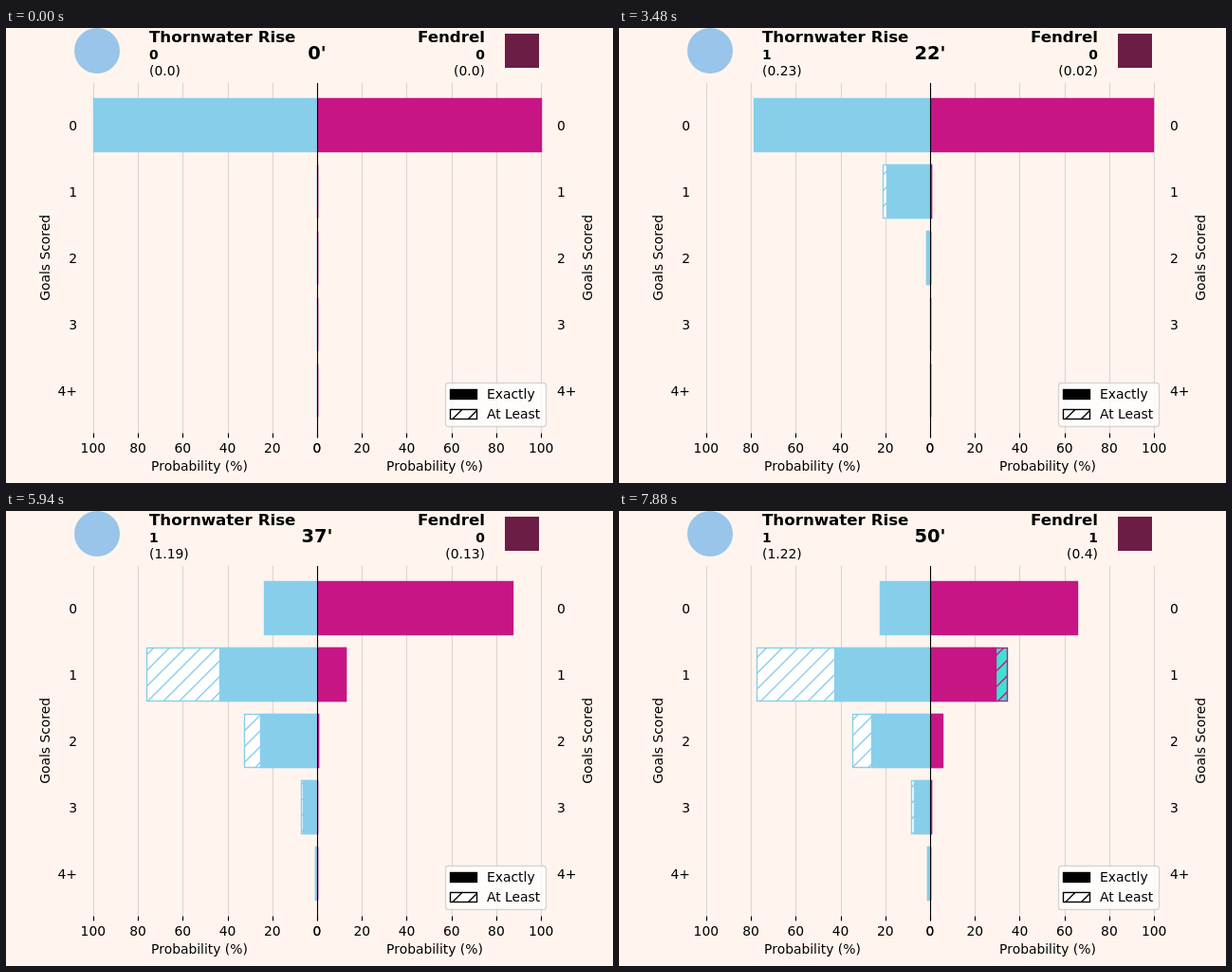
Write an HTML page with a canvas that moves like this. It is 640 px wide and 480 px high and loops after 8 s.

```html
<!DOCTYPE html>
<html lang="en">
<head>
<meta charset="utf-8">
<title>Goal probabilities</title>
<style>
html, body { margin: 0; width: 100%; height: 100%; overflow: hidden; background: #fff5ee; }
canvas { display: block; }
</style>
</head>
<body>
<canvas id="stage" width="640" height="480"></canvas>
<script>
const ctx = document.getElementById('stage').getContext('2d');
const LOOP = 8000, MINUTE = 160, SUBSTEP = 30, SUBSTEPS = 5;
const MID = 328, UNIT = 248 / 1.05, TOP = 57.6, BOTTOM = 427.2, ROW = 70;
const THIN = 1.11, EDGE = 1.39;
const FONT = '"DejaVu Sans", Verdana, sans-serif';

const teams = [
  { name: 'Thornwater Rise', dir: -1, textX: 151, align: 'left', color: '#87ceeb', back: '#fff' },
  { name: 'Fendrel', dir: 1, textX: 505, align: 'right', color: '#c71585', back: '#40e0d0' }
];

// Minute, team, chance of each shot, goals
const events = [
  [4, 0, [.015], 0], [9, 0, [.045], 0], [11, 0, [.10], 1], [18, 0, [.07], 0],
  [22, 1, [.02], 0], [24, 0, [.5, .3, .08], 0], [30, 1, [.11], 0],
  [37, 0, [.08], 0], [40, 1, [.10], 1],
  [44, 0, [.03], 0], [45, 1, [.085], 0], [47, 1, [.087], 0]
];

const snap = v => Math.floor(v + .5) + .5;

function clock(t) {
  for (let minute = 0; ; minute++) {
    const busy = events.some(e => e[0] === minute);
    const span = busy ? SUBSTEP * SUBSTEPS : MINUTE;
    if (t < span) return { minute, part: busy ? (Math.floor(t / SUBSTEP) + 1) / SUBSTEPS : 1 };
    t -= span;
  }
}

// Chances of 0, 1, 2, 3 and 4+ goals
function distribution(shots) {
  const d = [1, 0, 0, 0, 0];
  for (const p of shots)
    for (let i = 4; i >= 0; i--)
      d[i] = d[i] * (i === 4 ? 1 : 1 - p) + (i ? d[i - 1] * p : 0);
  return d;
}

function teamState(team, { minute, part }) {
  const past = events.filter(e => e[1] === team && e[0] <= minute);
  const shots = past.flatMap(e => e[2]);
  const before = distribution(past.filter(e => e[0] < minute).flatMap(e => e[2]));
  const exact = distribution(shots).map((v, i) => before[i] + (v - before[i]) * part);
  const xg = +shots.reduce((a, b) => a + b, 0).toFixed(2);
  return { exact, xg: xg ? String(xg) : '0.0', goals: past.reduce((a, e) => a + e[3], 0) };
}

function text(str, x, y, align = 'center', size = 10, bold = false) {
  ctx.font = `${bold ? 'bold ' : ''}${size * 100 / 72}px ${FONT}`;
  ctx.textAlign = align;
  ctx.fillStyle = '#000';
  ctx.fillText(str, x, y);
}

function sideText(str, x, y) {
  ctx.save();
  ctx.translate(x, y);
  ctx.rotate(-Math.PI / 2);
  text(str, 0, 0);
  ctx.restore();
}

function line(x1, y1, x2, y2, color, width) {
  ctx.strokeStyle = color;
  ctx.lineWidth = width;
  ctx.beginPath();
  ctx.moveTo(x1, y1);
  ctx.lineTo(x2, y2);
  ctx.stroke();
}

function box(x, y, w, h, fill, edge, hatched) {
  ctx.fillStyle = fill;
  ctx.fillRect(x, y, w, h);
  if (hatched && w > 0) {
    ctx.save();
    ctx.beginPath();
    ctx.rect(x, y, w, h);
    ctx.clip();
    const gap = 100 / 6;
    for (let s = Math.floor((x + y) / gap) * gap; s < x + y + w + h + gap; s += gap)
      line(s - y + 2, y - 2, s - y - h - 2, y + h + 2, edge, EDGE);
    ctx.restore();
  }
  ctx.strokeStyle = edge;
  ctx.lineWidth = EDGE;
  ctx.strokeRect(x, y, w, h);
}

function bar(team, row, value, fill, hatched) {
  const base = snap(MID), end = snap(MID + team.dir * value * UNIT);
  const top = snap(TOP + 16.8 + row * ROW);
  box(Math.min(base, end), top, Math.abs(end - base), 56, fill, team.color, hatched);
}

function drawSide(team, state) {
  const { dir, textX, align } = team;
  for (let v = 0; v <= 100; v += 20) {
    const x = snap(MID + dir * v / 100 * UNIT);
    if (v) line(x, 58, x, 427.5, 'rgba(176,176,176,.45)', THIN);
    line(x, 427.5, x, 432.4, '#000', THIN);
    text(v, MID + dir * v / 100 * UNIT, 448);
  }

  ctx.save();
  ctx.beginPath();
  ctx.rect(dir < 0 ? 80 : MID, 58, 248, 369);
  ctx.clip();
  let atLeast = 1;
  state.exact.forEach((p, row) => {
    if (row) bar(team, row, atLeast, team.back, true);
    bar(team, row, p, team.color, false);
    atLeast = Math.max(0, atLeast - p);
  });
  ctx.restore();

  for (let row = 0; row < 5; row++)
    text(row < 4 ? row : '4+', MID + dir * 253, 108 + row * ROW, dir < 0 ? 'right' : 'left');
  text('Probability (%)', MID + dir * 124, 467);
  sideText('Goals Scored', dir < 0 ? 46 : 618, 242.4);

  text(team.name, textX, 15, align, 12, true);
  text(state.goals, textX, 33, align, 10, true);
  text(`(${state.xg})`, textX, 50, align);
}

function drawLegend() {
  ctx.beginPath();
  ctx.roundRect(463.5, 374.5, 106, 46, 3);
  ctx.fillStyle = 'rgba(255,255,255,.8)';
  ctx.fill();
  ctx.strokeStyle = 'rgba(204,204,204,.8)';
  ctx.lineWidth = EDGE;
  ctx.stroke();
  box(468.5, 381.5, 28, 10, '#000', '#000', false);
  box(468.5, 402.5, 28, 10, '#fff', '#000', true);
  text('Exactly', 507, 391, 'left');
  text('At Least', 507, 412, 'left');
}

function drawBadges() {
  ctx.fillStyle = '#98c5e9';
  ctx.beginPath();
  ctx.arc(96, 24, 24, 0, 7);
  ctx.fill();
  ctx.fillStyle = '#6c1d45';
  ctx.fillRect(526, 6, 36, 36);
}

function frame(now) {
  const time = clock(now % LOOP);
  ctx.fillStyle = '#fff5ee';
  ctx.fillRect(0, 0, 640, 480);
  drawBadges();
  teams.forEach((team, i) => drawSide(team, teamState(i, time)));
  line(328.5, 58, 328.5, 428, '#000', THIN);
  drawLegend();
  text(`${time.minute}'`, MID, 33, 'center', 14, true);
  requestAnimationFrame(frame);
}
requestAnimationFrame(frame);
</script>
</body>
</html>
```
